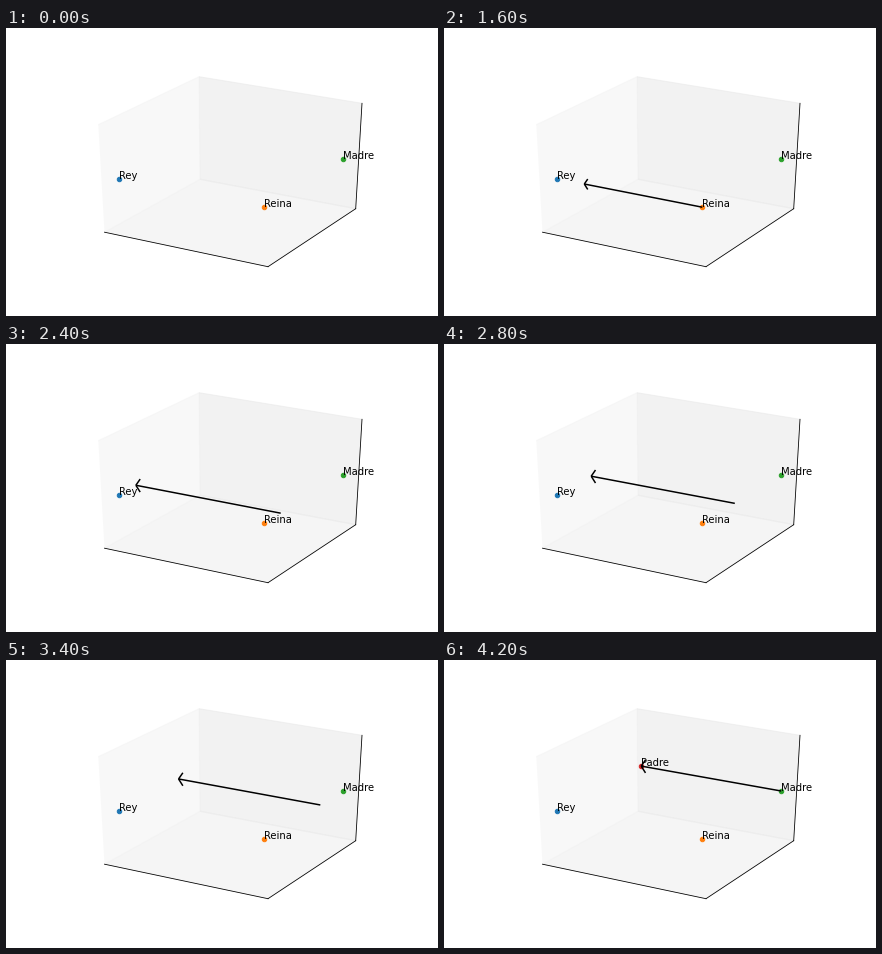
Animation of 432x288 px, one loop 6000 ms. Source, as a matplotlib script:

```python
import matplotlib.pyplot as plt
import numpy as np
from matplotlib.animation import FuncAnimation
from matplotlib.collections import LineCollection
from matplotlib.patches import Polygon

WIDTH, HEIGHT, DPI = 432, 288, 72
FRAMES, INTERVAL = 30, 200
GROW, SLIDE = 10, 10  # steps of each phase

plt.rcParams["font.family"] = "DejaVu Sans"
fig = plt.figure(figsize=(WIDTH / DPI, HEIGHT / DPI), dpi=DPI, facecolor="white")
ax = fig.add_axes([0, 0, 1, 1])
ax.set(xlim=(0, WIDTH), ylim=(HEIGHT, 0))
ax.axis("off")

# Corners of the box, in pixels
front_left, front_right = (98.5, 204.2), (262, 238.7)
back_left, back_right = (194, 151.3), (349.7, 180.7)
top_front, top_back, top_right = (92.3, 96.7), (193, 48.7), (356, 75.3)

PANES = [
    ((front_left, back_left, top_back, top_front), 0.95),
    ((back_left, back_right, top_right, top_back), 0.90),
    ((front_left, front_right, back_right, back_left), 0.925),
]
for corners, shade in PANES:
    ax.add_patch(Polygon(corners, closed=False, color=(shade,) * 3, alpha=0.5))

edges = [front_left, front_right], [front_right, back_right], [back_right, top_right]
for edge in edges:
    ax.plot(*zip(*edge), color="black", lw=0.8)


def add_word(x, y, word, color):
    dot = ax.scatter([x], [y], s=20, color=color, zorder=3)
    label = ax.text(x, y, word, fontsize=10, color="black", zorder=5)
    return dot, label


add_word(112.5, 150.6, "Rey", "C0")
add_word(258.4, 179.4, "Reina", "C1")
add_word(337.4, 131.3, "Madre", "C2")
padre = add_word(197.3, 106.4, "Padre", "C3")

REY, REINA = np.array([112.2, 150.5]), np.array([258.3, 179.2])
PADRE, MADRE = np.array([197.2, 106.1]), np.array([337.2, 131.0])
BARBS = np.array([[4.3, -6.2], [4.3, 6.8]])

arrow = LineCollection([], colors="black", linewidths=1.5, zorder=4)
ax.add_collection(arrow)


def travel(start, end, t, depth=0.05):
    """Point on a segment at time t, with slight foreshortening."""
    return start + (end - start) * t * (1 + depth) / (1 + depth * t)


def update(frame):
    grow = min(frame / GROW, 1)
    slide = np.clip((frame - GROW) / SLIDE, 0, 1)
    if slide > 0:
        tail, tip = travel(REINA, MADRE, slide), travel(REY, PADRE, slide)
    else:
        tail, tip = REINA, travel(REINA, REY, grow)
    barbs = [[tip, tip + grow * barb] for barb in BARBS]
    arrow.set_segments([[tail, tip], *barbs] if frame else [])
    for artist in padre:
        artist.set_visible(frame > GROW + SLIDE)
    return arrow, *padre


anim = FuncAnimation(fig, update, frames=FRAMES, interval=INTERVAL,
                     repeat=True, repeat_delay=0)
plt.show()
```
